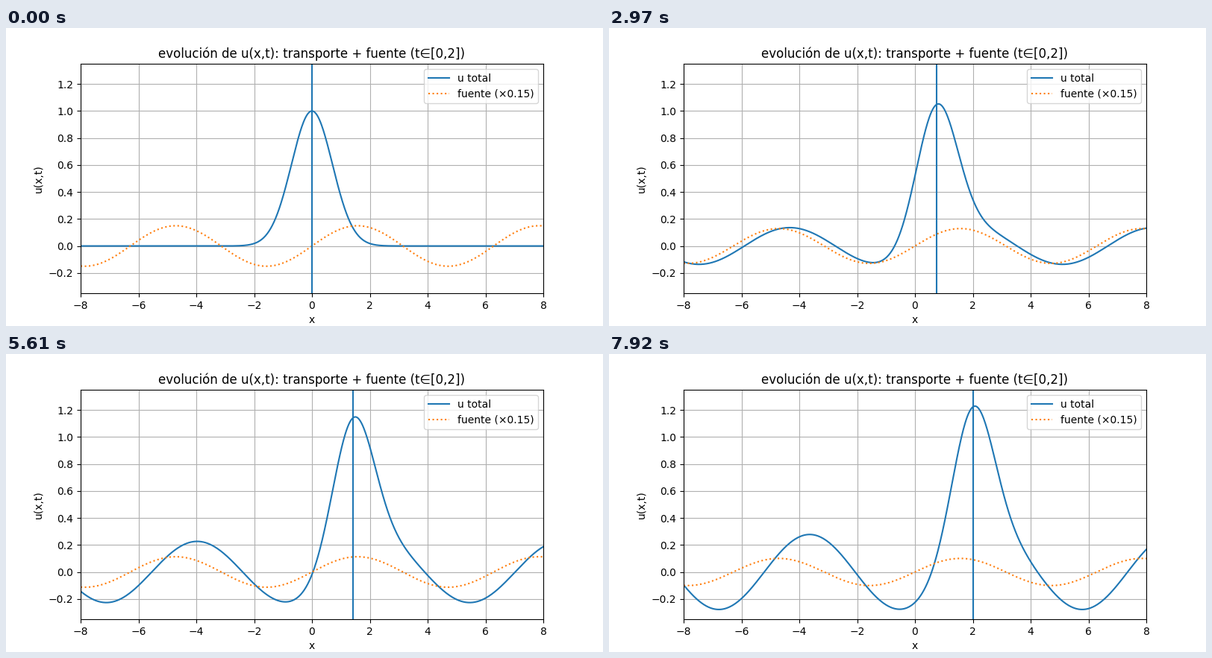
Recreate the animation shown at these times as a matplotlib script. Size 800x400 px, loop 8000 ms.

```python
import numpy as np
import matplotlib.pyplot as plt
from matplotlib.animation import FuncAnimation

SPEED, DECAY, GAIN = 1.0, 0.2, 0.2
T_END, STEPS = 2.0, 25
HOLD, LOOP, TICK = 330, 8000, 40  # ms

x = np.linspace(-8, 8, 800)
times = np.linspace(0, T_END, STEPS)


def total(t):
    """Advected Gaussian plus the accumulated decaying sine source."""
    y = x - SPEED * t
    k = 1j * SPEED - DECAY
    forced = np.exp(1j * y) * (np.exp(k * t) - 1) / k
    return np.exp(-y**2) + GAIN * forced.imag


def source(t):
    return 0.15 * np.exp(-DECAY * t) * np.sin(x)


plt.rcParams["font.family"] = "DejaVu Sans"
fig, ax = plt.subplots(figsize=(8, 4), dpi=100)
wave, = ax.plot(x, total(0), label="u total")
src, = ax.plot(x, source(0), ":", label="fuente (×0.15)")
front = ax.axvline(0, color="C0")
ax.set(xlim=(-8, 8), ylim=(-0.35, 1.35), xlabel="x", ylabel="u(x,t)",
       title="evolución de u(x,t): transporte + fuente (t∈[0,2])")
ax.grid(True)
ax.legend(loc="upper right")


def update(frame):
    step = int((frame + 0.5) * TICK // HOLD)
    t = times[min(step, STEPS - 1)]
    wave.set_ydata(total(t))
    src.set_ydata(source(t))
    front.set_xdata([SPEED * t] * 2)
    return wave, src, front


anim = FuncAnimation(fig, update, frames=LOOP // TICK, interval=TICK,
                     repeat=True, repeat_delay=0)
plt.show()
```
